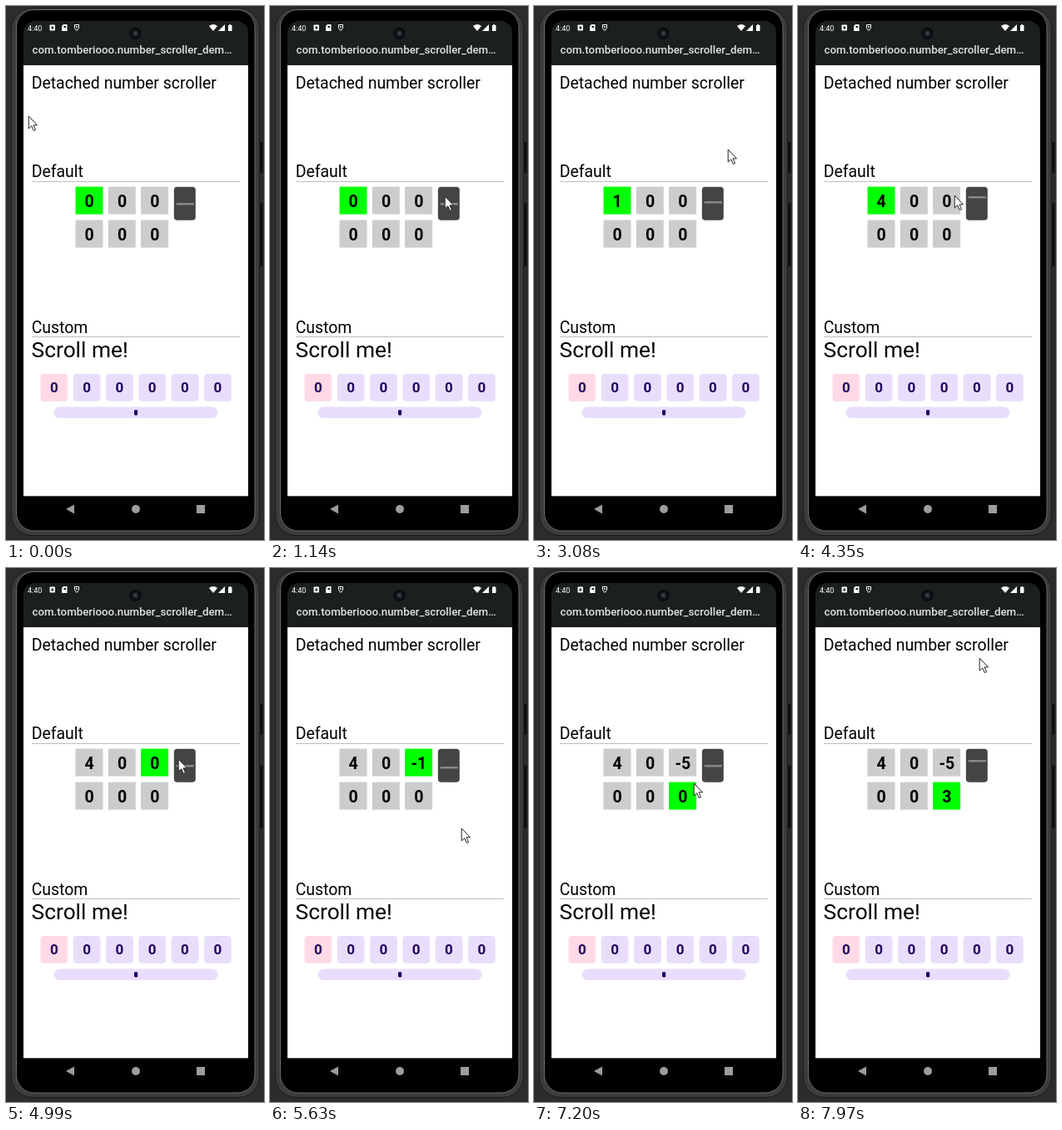
Write an HTML page that moves like this. It is 310 px wide and 640 px high and loops after 8 s.

```html
<!DOCTYPE html>
<html lang="en">
<head>
<meta charset="utf-8">
<title>Number scroller</title>
<style>
  html, body { margin: 0; width: 100%; height: 100%; overflow: hidden; background: #2b2c2d; }
  svg { display: block; width: 310px; height: 640px; font-family: Roboto, sans-serif; }
  .head { font-size: 19.45px; }
  .cell { font-size: 19.5px; font-weight: 700; text-anchor: middle; }
  .custom { font-size: 17px; font-weight: 700; text-anchor: middle; fill: #22005d; }
  .rule { stroke: #bcbcbc; }
</style>
</head>
<body>
<svg viewBox="0 0 310 640">
  <!-- phone body -->
  <rect width="310" height="640" fill="#2b2c2d"/>
  <rect x="305.5" y="163" width="3" height="37" rx="1" fill="#0c0c0c"/>
  <rect x="305.5" y="236" width="3" height="76" rx="1" fill="#0c0c0c"/>
  <rect x="6.5" y="2.5" width="298" height="632" rx="25" fill="#3a3c3e" stroke="#1a1b1c"/>
  <rect x="12.5" y="4.5" width="286.5" height="624.5" rx="21" fill="#000" stroke="#66696c"/>

  <!-- screen -->
  <path d="M21 71V32a14 14 0 0 1 14-14H277a14 14 0 0 1 14 14V71z" fill="#1b1f20"/>
  <rect x="21" y="71" width="270" height="516.4" fill="#fff"/>
  <circle cx="155.5" cy="33" r="7" fill="#0a0c0d"/>
  <circle cx="155.5" cy="33" r="3.8" fill="#23282e"/>
  <circle cx="155.5" cy="32.5" r="1.4" fill="#424b54"/>

  <!-- status bar -->
  <g fill="#fff">
    <text x="26" y="29.5" font-size="9">4:40</text>
    <rect x="52.5" y="22.5" width="6.5" height="7" rx="1"/>
    <path d="M69 22h4.5v8H67v-6z"/>
    <path d="M82.500 22.500h5v4l-2.500 3-2.500-3z" fill="none" stroke="#fff"/>
    <circle cx="85" cy="25" r="1"/>
    <path d="M244 24q5-4 10 0l-5 6z"/>
    <path d="M263 22v8h-8z"/>
    <path d="M267 23h1.200v-1h2v1h1.300v7H267z"/>
  </g>
  <path d="M54.500 24.500H57v3h-2.500zM69.500 24H72v2h-2.500z" fill="#1b1f20"/>
  <text x="31.500" y="57" font-size="13.3" font-weight="500" fill="#e1e4e4">com.tomberiooo.number_scroller_dem…</text>

  <!-- page -->
  <text class="head" x="30.700" y="98.500">Detached number scroller</text>
  <text class="head" x="30.700" y="205.300">Default</text>
  <path class="rule" d="M31 210.500H281M31 396.500H281"/>
  <text class="head" x="30.700" y="391.500">Custom</text>
  <text x="30.600" y="421" font-size="26.3">Scroll me!</text>
  <g id="cells"></g>
  <rect x="201.800" y="216.800" width="26" height="40" rx="4" fill="#444"/>
  <rect id="mark" x="204.500" y="236" width="21.500" height="2.500" rx="1" fill="#888"/>
  <g id="customs"></g>
  <rect x="57.500" y="480.500" width="197" height="13.500" rx="6.700" fill="#e8defc"/>
  <rect x="154" y="484" width="4.200" height="6.500" rx="1.500" fill="#22005d"/>

  <!-- navigation -->
  <g fill="#9c9c9c">
    <path d="M72 603l10-5.500v11z"/>
    <circle cx="156" cy="603" r="5"/>
    <rect x="229" y="598" width="10" height="10"/>
  </g>

  <path id="cursor" d="M1.200 1V16L4.700 12.800 7.300 18.500 9.500 17.500 7 11.900H11.500z"
        fill="#fff" stroke="#222" stroke-linejoin="round"/>
</svg>
<script>
  const LOOP = 8000;
  const TICK = 77;
  const PITCH = 39.3;
  const byId = id => document.getElementById(id);

  function add(parent, tag, attrs, text = '') {
    const el = document.createElementNS('http://www.w3.org/2000/svg', tag);
    for (const name in attrs) el.setAttribute(name, attrs[name]);
    el.textContent = text;
    byId(parent).appendChild(el);
    return el;
  }

  const cells = Array.from({ length: 6 }, (_, i) => {
    const x = 83.5 + (i % 3) * PITCH, y = 216.6 + Math.floor(i / 3) * 40;
    return {
      box: add('cells', 'rect', { x, y, width: 33, height: 33 }),
      label: add('cells', 'text', { class: 'cell', x: x + 16.7, y: y + 24.2 })
    };
  });

  for (let i = 0; i < 6; i++) {
    const x = 41.5 + i * PITCH;
    add('customs', 'rect', { x, y: 441, width: 32.7, height: 32.7, rx: 4, fill: i ? '#e8defc' : '#ffd9e3' });
    add('customs', 'text', { class: 'custom', x: x + 16.3, y: 463.3 }, '0');
  }

  const point = (start, end, x, y) => ({ start, end, x, y });
  const drag = (start, end, x, y, value) => ({ start, end, x, y, value });
  const pick = (start, cell) => ({ start, cell });

  const actions = [
    point(180, 340, 93, 149),
    point(740, 1140, 209, 227),
    drag(1530, 2300, 228, 389, -5.6),
    drag(2470, 3170, 232, 165, 2),
    drag(3320, 3720, 227, 115, 4),
    point(4120, 4583, 181, 241),
    pick(4660, 2),
    point(4990, 5150, 220, 221),
    drag(5400, 6100, 236, 382, -5),
    point(6450, 6810, 173, 265),
    pick(6960, 5),
    point(7200, 7520, 216, 246),
    drag(7670, 7970, 217, 107, 3)
  ];

  const mix = (a, b, f) => a * (1 - f) + b * f;
  const easeOut = (u, power) => 1 - (1 - u) ** power;
  const smooth = u => u * u * (3 - 2 * u);

  function progress({ start, end }, t) {
    const steps = Math.round((end - start) / TICK) + 1;
    const gap = (end - start) / (steps - 1);
    return Math.min(1, (1 + Math.floor((t - start) / gap + .3)) / steps);
  }

  function stateAt(t) {
    const values = Array(6).fill(0);
    let x = 26, y = 131, active = 0;
    for (const action of actions) {
      if (t < action.start) break;
      if ('cell' in action) {
        active = action.cell;
        continue;
      }
      const dragging = 'value' in action;
      const u = progress(action, t), f = easeOut(u, dragging ? 1.6 : 2.5);
      x = mix(x, action.x, f);
      y = mix(y, action.y, f);
      // The number lags behind the pointer.
      if (dragging) values[active] = mix(values[active], action.value, smooth(u));
    }
    return { x: Math.round(x), y: Math.round(y), values: values.map(v => Math.trunc(v) || 0), active };
  }

  function draw() {
    const { x, y, values, active } = stateAt(performance.now() % LOOP);
    cells.forEach(({ box, label }, i) => {
      box.setAttribute('fill', i === active ? '#0f0' : '#ccc');
      label.textContent = values[i];
    });
    byId('mark').setAttribute('y', 236 - 2 * values[active]);
    byId('cursor').setAttribute('transform', `translate(${x} ${y})`);
    requestAnimationFrame(draw);
  }
  draw();
</script>
</body>
</html>
```
